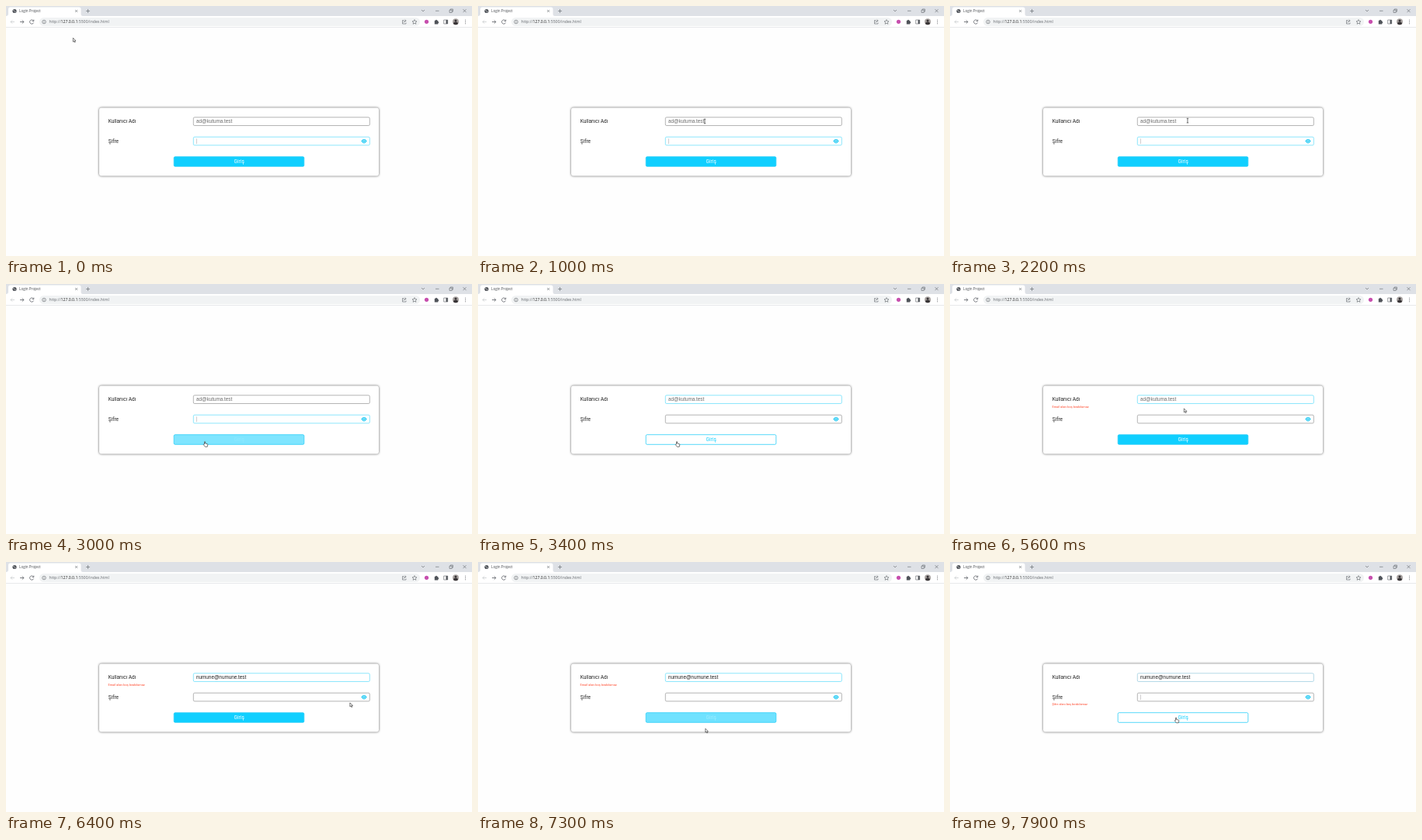
Animation of 600 by 323 pixels, one loop 8000 ms. Source, as an HTML page:

```html
<!DOCTYPE html>
<html lang="tr">
<head>
<meta charset="utf-8">
<title>Login Project</title>
<style>
  html, body { margin: 0; width: 100%; height: 100%; overflow: hidden; background: #fefefe; }
  svg { display: block; width: 600px; height: 323px; }
  .ui { font-family: "Open Sans", sans-serif; }
  .form { font-family: Roboto, sans-serif; fill: #222; }
  .label { font-size: 6.5px; }
  .error { font-size: 3.9px; fill: #ff4326; }
  .field { font: 6.35px "Liberation Sans", Arial, sans-serif; }
  .input { fill: #fff; stroke-width: .65; }
  .line { fill: none; stroke: #5c6066; stroke-width: .6; }
  .pointer { fill: #fff; stroke: #222; stroke-width: .6; stroke-linejoin: round; }
  .card { filter: drop-shadow(0 0 1.6px #555); }
</style>
</head>
<body>
<svg viewBox="0 0 600 323">
  <g class="ui">
    <rect width="600" height="13" fill="#dee1e6"/>
    <path d="M0 13Q3 13 3 10V4Q3 1.5 5.5 1.5H94Q96.5 1.5 96.5 4V10Q96.5 13 99 13V14H0Z" fill="#fff"/>
    <rect y="13" width="600" height="14" fill="#fff"/>
    <rect y="27" width="600" height=".7" fill="#dfe1e4"/>
    <circle cx="11" cy="6.5" r="2.6" fill="#50545a"/>
    <path d="M9.5 5.5l1.5 .8M11 8l1.400-.8" stroke="#fff" stroke-width=".7"/>
    <text x="17" y="8.200" font-size="4.6" fill="#45494d">Login Project</text>
    <path class="line" d="M89 5l3 3m0-3l-3 3M103 6.500h5M105.500 4v5"/>
    <path class="line" d="M535 5l2 2 2-2M553 6.300h4.500M588.500 4.200l4 4m0-4l-4 4M571 5.200h3.200v3.200H571zM572.200 5v-1h3.200v3.200h-1"/>

    <path class="line" style="stroke:#b9bcc0" d="M11 20.500H6m2.200-2.200L6 20.500l2.200 2.200"/>
    <path class="line" style="stroke-width:.8" d="M18 20.500h5m-2.200-2.200l2.200 2.200-2.200 2.200M35.300 19A2.600 2.600 0 1 0 35.600 21.500M35.800 17.600v2h-2"/>
    <rect x="43" y="15" width="490" height="11" rx="5.500" fill="#f1f3f4"/>
    <circle class="line" cx="49" cy="20.500" r="2.300"/>
    <path class="line" d="M49 20.200v1.500M49 19v.5"/>
    <text x="55.500" y="22.300" font-size="5.15" fill="#666a6f">http://<tspan fill="#222">127.0.0.1</tspan>:5500/index.html</text>
    <path class="line" d="M512.500 18.500h-2v4.500h4.500v-1.500M512 21.500q0-2.500 3-2.500m-1.400-1.500l1.600 1.500-1.600 1.500"/>
    <path class="line" d="M526 17.600l.9 2 2.100.2-1.600 1.400.5 2.100-1.900-1.100-1.900 1.100.5-2.100-1.600-1.400 2.100-.2z"/>
    <circle cx="541.500" cy="20.300" r="2.600" fill="#c74fae"/>
    <path d="M551.800 18.800h1.200a1 1 0 0 1 2 0h1.300v1.500a1 1 0 0 1 0 2v1.300h-4.500z" fill="#50545a"/>
    <path class="line" d="M563.700 18h5v5h-5z"/>
    <path d="M566.500 18h2.200v5h-2.200z" fill="#50545a"/>
    <circle cx="579" cy="20.300" r="4" fill="#a9a4a2"/>
    <path d="M576 23a3 2.600 0 0 1 6 0 4 4 0 0 1-6 0z" fill="#383436"/>
    <circle cx="579" cy="18.900" r="1.500" fill="#383436"/>
    <path d="M591.500 18.200v.01m0 2.290v.01m0 2.290v.01" stroke="#50545a" stroke-linecap="round"/>
  </g>

  <g class="form">
    <rect class="card" x="120" y="131.500" width="360" height="88" rx="3" fill="#fff"/>
    <text class="label" x="131.700" y="151.200">Kullanıcı Adı</text>
    <text class="label" x="131.700" y="176.900">Şifre</text>
    <text class="error" id="mailError" x="131.500" y="160">Email alanı boş bırakılamaz</text>
    <text class="error" id="passError" x="131.500" y="185">Şifre alanı boş bırakılamaz</text>

    <rect class="input" id="mail" x="241.300" y="143.800" width="227" height="10.700" rx="1.600"/>
    <text class="field" id="hint" x="245" y="151.300" fill="#6c6c6c">ad@kutuma.test</text>
    <text class="field" id="value" x="245" y="151.300">numune@numune.test</text>

    <rect class="input" id="pass" x="241.300" y="169.200" width="227" height="10.700" rx="1.600"/>
    <rect id="caret" x="245.100" y="171.300" width=".6" height="6.800" fill="#b0aeb0"/>
    <path d="M457.400 174.600Q461 169 464.600 174.600Q461 180.200 457.400 174.600Z" fill="#13c6f3"/>
    <circle cx="461" cy="174.600" r="1.500" fill="#13c6f3" stroke="#fff" stroke-width=".7"/>

    <rect id="button" x="216.200" y="194.700" width="167.600" height="12.600" rx="1.500" fill="#10cfff" stroke="#2bcef8" stroke-width=".8"/>
    <text id="buttonText" x="300.200" y="203.400" font-size="6.5" text-anchor="middle">Giriş</text>
  </g>

  <g id="cursor">
    <path class="pointer" id="arrow" d="M.3 .3V5.200L1.500 4.200 2.300 6 3.200 5.600 2.400 3.900H3.900Z"/>
    <path id="beam" d="M-1.200-2.800H1.200M0-2.800V2.800M-1.200 2.800H1.200" fill="none" stroke="#333" stroke-width=".7"/>
    <path class="pointer" id="hand" d="M-.5 4V.8Q0 .1 .6 .8V3L3.300 3.600Q3.900 3.900 3.700 5L3.200 7.300H.4L-1.700 4.600Q-1.500 3.600-.5 4Z"/>
  </g>
</svg>

<script>
  const LOOP = 8000, FADE = 450, BLINK = 530;
  const FIRST_SUBMIT = 3320, AUTOFILL = 5880, SECOND_SUBMIT = 7780;
  const GREY = '#8c8c8c', CYAN = '#4fd9fb';

  // Pointer stops: [ms, x, y]
  const stops = [
    [0, 86, 41], [100, 86, 41], [200, 100, 20], [600, 195, 200], [900, 292, 149],
    [1350, 292, 149], [1400, 348, 88], [1700, 348, 88], [2200, 306, 148], [2900, 256, 203],
    [4250, 256, 203], [4500, 285.5, 160.5], [4800, 301, 160.5], [5600, 301, 160.5],
    [5900, 305, 178], [6450, 456, 182], [6900, 390, 200], [7300, 292.5, 215],
    [7550, 291, 200.5], [LOOP, 291, 200.5]
  ];

  const el = {};
  document.querySelectorAll('[id]').forEach(node => el[node.id] = node);
  const paint = (id, attrs) => Object.entries(attrs).forEach(([k, v]) => el[id].setAttribute(k, v));
  const show = (id, on) => paint(id, { opacity: on ? 1 : 0 });

  function pointer(t) {
    const i = stops.findIndex(s => s[0] > t);
    const [t0, x0, y0] = stops[i - 1], [t1, x1, y1] = stops[i];
    const p = (t - t0) / (t1 - t0);
    return [x0 + (x1 - x0) * p, y0 + (y1 - y0) * p];
  }

  function over(id, [x, y]) {
    const { x: left, y: top, width, height } = el[id].getBBox();
    return x > left && x < left + width && y > top && y < top + height;
  }

  // Share of the last FADE ms that the pointer spent on the button.
  function hover(t) {
    const samples = 30;
    let hits = 0;
    for (let i = 0; i < samples; i++) {
      hits += over('button', pointer(Math.max(0, t - FADE * i / samples)));
    }
    return hits / samples;
  }

  function draw(t) {
    const at = pointer(t);
    const hand = over('button', at), beam = over('mail', at) || over('pass', at);
    paint('cursor', { transform: `translate(${at})` });
    show('hand', hand);
    show('beam', beam);
    show('arrow', !hand && !beam);

    const h = hover(t);
    paint('button', { 'fill-opacity': 1 - h });
    paint('buttonText', { fill: `rgb(${255 - 239 * h}, ${255 - 48 * h}, 255)` });

    const first = t >= FIRST_SUBMIT, second = t >= SECOND_SUBMIT, filled = t >= AUTOFILL;
    paint('mail', {
      stroke: second ? '#8bc4da' : first ? CYAN : GREY,
      fill: filled ? '#e6f0fd' : '#fff'
    });
    paint('pass', { stroke: first ? GREY : CYAN });
    show('hint', !filled);
    show('value', filled);
    show('mailError', t >= FIRST_SUBMIT + 150 && !second);
    show('passError', second);
    show('caret', second || !first && Math.floor((t + BLINK - 110) / BLINK) % 2 === 0);
  }

  function tick() {
    draw(performance.now() % LOOP);
    requestAnimationFrame(tick);
  }
  tick();
</script>
</body>
</html>
```
